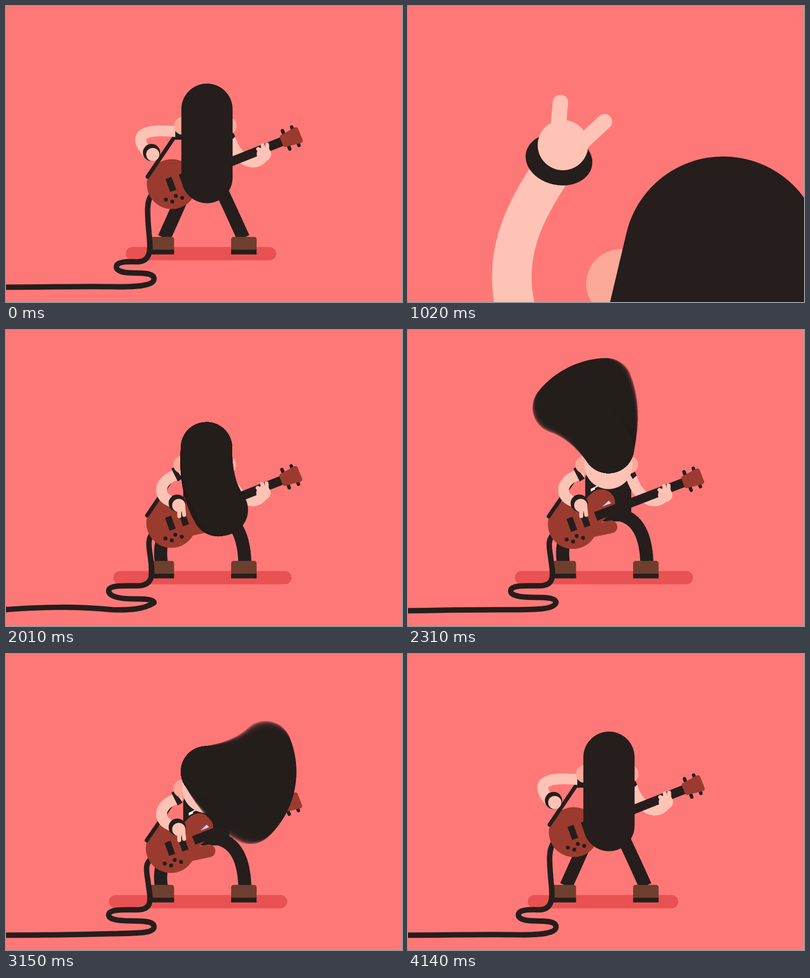
Recreate the animation shown at these times as an HTML page with a canvas. Size 800 px wide and 600 px high, loop 4560 ms.

```html
<!DOCTYPE html>
<html lang="en">
<head>
<meta charset="utf-8">
<title>Guitarist</title>
<style>
html, body { margin: 0; width: 100%; height: 100%; overflow: hidden; background: #ff7878; }
canvas { display: block; width: 100%; height: 100%; }
</style>
</head>
<body>
<canvas id="stage" width="800" height="600"></canvas>
<script>
const ctx = document.getElementById('stage').getContext('2d');
const LOOP = 4560, STEP = 30;
const CUT_IN = 690, FLASH = 1500, CUT_OUT = 1740, SPIN_END = 3640;
const PINK = '#ff7878', INK = '#251e1c', SKIN = '#ffc3b5', EAR = '#fca999', WOOD = '#9b3b2f';

const rad = d => d * Math.PI / 180;
const mix = (a, b, u) => a + (b - a) * u;
const ease = u => u * u * (3 - 2 * u);
const ramp = (t, from, to) => ease(Math.min(1, Math.max(0, (t - from) / (to - from))));

function fill(color) {
  ctx.fillStyle = color;
  ctx.fill();
}

function disc(x, y, r, color) {
  ctx.beginPath();
  ctx.arc(x, y, r, 0, 7);
  fill(color);
}

function box(x, y, w, h, r, color) {
  ctx.beginPath();
  ctx.roundRect(x, y, w, h, r);
  fill(color);
}

function poly(points, color) {
  ctx.beginPath();
  for (const p of points) ctx.lineTo(...p);
  ctx.closePath();
  fill(color);
}

function stroke(width, color, cap = 'round') {
  ctx.lineWidth = width;
  ctx.lineCap = cap;
  ctx.lineJoin = 'round';
  ctx.strokeStyle = color;
  ctx.stroke();
}

function line(x0, y0, x1, y1, width, color, cap) {
  ctx.beginPath();
  ctx.moveTo(x0, y0);
  ctx.lineTo(x1, y1);
  stroke(width, color, cap);
}

// Limb as one cubic curve
function limb([a, b, c, d], width, color, cap) {
  ctx.beginPath();
  ctx.moveTo(...a);
  ctx.bezierCurveTo(...b, ...c, ...d);
  stroke(width, color, cap);
}

// Points part way between two poses
const pose = (from, to, u) => from.map((p, i) => p.map((v, j) => mix(v, to[i][j], u)));

function placed(x, y, angle, draw) {
  ctx.save();
  ctx.translate(x, y);
  ctx.rotate(rad(angle));
  draw();
  ctx.restore();
}

// ---- hair windmill ----
// Time, root angle in degrees, speed in degrees per ms
const SPIN = [[1940, 90, 0], [2610, 915, 3.1], [3150, 2222, 1.5], [SPIN_END, 2610, 0]];
const SHUTTER = 44, COPIES = 64;

function hairAngle(t) {
  const i = SPIN.findIndex(s => t < s[0]);
  if (i <= 0) return 90;
  const [t0, a, va] = SPIN[i - 1], [t1, b, vb] = SPIN[i];
  const d = t1 - t0, u = (t - t0) / d;
  return mix(a, b, ease(u)) + d * u * (1 - u) * (va * (1 - u) - vb * u);
}

// The tip trails the root, then swings out
function hairBend(t) {
  if (t < SPIN_END) return 15 * ramp(t, CUT_OUT, 2010);
  const rest = t - SPIN_END;
  return t < 4140 ? 15 * Math.exp(-rest / 120) * Math.cos(rest / 80) : 0;
}

function lock(x, y, angle, bend, length) {
  const root = rad(angle), tip = rad(angle - bend);
  ctx.beginPath();
  ctx.moveTo(x, y);
  ctx.quadraticCurveTo(x + Math.cos(root) * length * .6, y + Math.sin(root) * length * .6,
    x + Math.cos(tip) * length, y + Math.sin(tip) * length);
  stroke(103.5, INK);
}

function hair(t, k) {
  const crouch = Math.max(0, k), bend = hairBend(t);
  const angle = t < SPIN_END ? hairAngle(t) : 90;
  const span = t < SPIN_END ? angle - hairAngle(t - SHUTTER) : 0;
  const draw = a => lock(406 - crouch, 209 + 29.5 * k, a, bend, mix(139, 130, crouch));
  if (span < .5) return draw(angle);
  ctx.globalAlpha = .45;
  for (let i = 0; i < COPIES; i++) draw(angle - span * i / (COPIES - 1));
  ctx.globalAlpha = 1;
}

// ---- wide shot ----
function cord(t, k) {
  const c = Math.max(0, k), lift = 32 * Math.min(0, k);
  const flick = ramp(t, CUT_OUT, 2000) * (1 - ramp(t, 2040, 2450));
  const left = mix(223, 207.5, c), mid = 541 + 4 * flick, right = 299;
  const side = mix(289, 287, c) + 5 * flick;
  ctx.beginPath();
  ctx.moveTo(-5, 570 - 3 * flick);
  ctx.bezierCurveTo(80, 570 - 9 * flick, 140, mix(568, 569, c) - 9 * flick, 215, mix(569, 567, c));
  ctx.bezierCurveTo(270 - 20 * flick, mix(570, 566, c) + 2 * flick, right - 20 * flick, 566, right, 553);
  ctx.bezierCurveTo(right, mid, 275, mid, 255, mid);
  ctx.bezierCurveTo(left + 14, mid, left, 537, left, 529);
  ctx.bezierCurveTo(left, 518, left + 22, 518, 262, 518.5);
  ctx.bezierCurveTo(mix(295, 302, c), 520, side + 3, 490, side, 462);
  ctx.bezierCurveTo(side - 3, mix(425, 440, c), mix(282, 279, c) + 6 * flick, mix(395, 425, c) + lift,
    296, mix(380, 412, c) + lift);
  stroke(11, INK);
}

function leg(hip, knee, foot) {
  ctx.beginPath();
  ctx.moveTo(...hip);
  ctx.quadraticCurveTo(...knee, ...foot);
  stroke(26.5, INK, 'butt');
}

function legs(k) {
  const c = Math.max(0, k), hipY = mix(375, 373, c) + 30 * Math.min(0, k);
  leg([mix(362, 372, c), hipY], [mix(341, 304, c), mix(422, 395, c)], [mix(319.5, 313.5, c), 470]);
  leg([mix(436, 417, c), hipY], [mix(458, 479, c), mix(422, 377, c)], [mix(479.5, 482.5, c), 470]);
  for (const x of [288, 454.8]) {
    box(x, 468, 51.5, 27, [5, 5, 0, 0], '#6e3f2e');
    box(x, 494, 51.5, 9.5, 0, INK);
  }
}

// Drawn around the middle of the body
function guitar() {
  disc(0, 0, 50.5, WOOD);
  line(30, -16, 57, -43, 56, WOOD);
  line(35, 14, 77, 5, 26, WOOD);
  poly([[59, -36], [72, -48], [77, -43]], '#c4d8ff');
  for (const x of [-2, 25])
    placed(x, -x / 3, -20, () => box(-6.5, -14, 13, 28, 0, INK));
  for (let i = 0; i < 4; i++) {
    const col = i % 2, row = i >> 1;
    disc(13 * col + 20 * row - 12, 31.5 + 4 * col - 7.5 * row, 4, INK);
  }
  placed(46, -16, -21.7, () => {
    line(0, 0, 193, 0, 18.5, INK, 'butt');
    for (const x of [199, 219])
      for (const side of [-1, 1]) line(x, 12 * side, x, 20 * side, 7, INK);
    poly([[194, -8], [225, -12], [225, 12], [194, 8]], WOOD);
    stroke(10, WOOD);
  });
  line(-49, -15, 7, -98, 8, INK);
  disc(186, -61, 14.5, SKIN);
  for (let i = 0; i < 3; i++)
    line(183 + 5 * i, -62, 174.5 + 9 * i, [-71, -79, -80][i], 8, SKIN);
}

function strumArm(s) {
  limb(pose([[347, 255], [290, 249], [248, 255], [288, 300]],
    [[347, 263], [305, 275], [305, 315], [345, 320]], s), 22, SKIN);
  const [[cx, cy], [hx, hy]] = pose([[294, 297], [296.5, 301]], [[347, 321], [350, 325.5]], s);
  disc(cx, cy, 17.5, INK);
  disc(hx, hy, 13.3, SKIN);
  for (const x of [1, 11]) line(hx + x * .8, hy, hx + x * s, hy + (22 - x / 4) * s, 8, SKIN);
}

function torso() {
  box(359, 262, 93, 96, 8, INK);
  limb([[453, 270], [468, 315], [505, 330], [522, 302]], 22, SKIN);
  ctx.beginPath();
  for (const p of [[383, 287], [371, 293], [378, 292], [371, 296]]) ctx.lineTo(...p);
  stroke(2.5, '#fff');
}

function headAndSleeves(s) {
  poly(pose([[342, 253], [356, 253], [356, 271], [342, 271]],
    [[335, 251], [341, 248], [358, 271], [348, 277]], s), INK);
  poly([[449, 262], [459, 256], [463, 265], [455, 272]], INK);
  for (const x of [357, 448]) disc(x, 243, 18, EAR);
  disc(406, 244, 48.5, SKIN);
}

function wide(t) {
  const intro = t < CUT_IN;
  const k = intro ? -.6 * ramp(t, 0, 540) : ramp(t, CUT_OUT, 2005) - ramp(t, SPIN_END, 4110);
  const strum = intro ? 0 : 1 - ramp(t, SPIN_END, 4080);
  const sag = ramp(t, 2010, 2250) - ramp(t, SPIN_END, 4080);
  const c = Math.max(0, k), drop = 30 * k;
  const center = 394 + 3 * c - 10 * (ramp(t, 2010, 3450) - ramp(t, SPIN_END, 4110));
  const half = mix(152, 180, c);

  box(center - half, 488.5, 2 * half, 27, 13.5, '#e85252');
  legs(k);
  cord(t, k);
  placed(-c, drop, 0, torso);
  placed(335 - c - sag, 361 + drop + 2.3 * sag, .6 * sag, guitar);
  placed(-c, drop, 0, () => {
    strumArm(strum);
    headAndSleeves(strum);
  });
  hair(t, k);
}

// ---- close-up ----
const STREAK_TIPS = [[58, 63], [302, 28], [516, 77], [690, 53], [787, 280],
  [777, 562], [649, 576], [110, 570], [79, 494], [31, 402]];

// Rays from the middle, widest towards the corners
function streaks(t) {
  const grow = 1 + (t - FLASH) / 700;
  for (const [x, y] of STREAK_TIPS) {
    const angle = Math.atan2(y - 300, x - 400);
    const reach = Math.hypot(x - 400, y - 300) * grow;
    const width = 300 * (.03 + .17 * Math.sin(2 * angle) ** 4);
    placed(400, 300, angle * 180 / Math.PI, () =>
      poly([[reach, 0], [reach + 300, -width], [reach + 300, width]], '#45c2fb'));
  }
}

function closeUp(t) {
  const flash = t >= FLASH;
  const fall = ramp(t, FLASH, CUT_OUT);
  const rise = ramp(t, CUT_IN, 1020);
  // Fist shoots up, overshoots and settles; later it drops
  const fist = flash ? mix(47, 330, fall)
    : mix(mix(300, -180, ramp(t, CUT_IN, 810)), 0, ramp(t, 810, 1020)) + 3 * ramp(t, 1020, 1110);
  const tilt = flash ? mix(18.3, 24, fall) : 13.3 * rise;
  const dip = flash ? mix(11, 60, fall) : 30 * (rise - 1);

  if (flash) box(0, 0, 800, 600, 0, '#92576a');
  limb([[218, 620 + fist * .5], [199, 530 + fist * .5], [208, 450 + fist * .6], [299, 322 + fist]],
    80, SKIN, 'butt');
  placed(-fist / 30, fist, 0, () => {
    ctx.beginPath();
    ctx.ellipse(305, 311, 68, 52, rad(12), 0, 7);
    fill(INK);
    disc(313, 282, 51, SKIN);
    line(303, 250, 308, 195.5, 31, SKIN);
    line(345, 283, 397, 234.5, 31, SKIN);
  });
  disc(430 - dip / 11, 563 + dip * .4, 70, EAR);
  placed(637 - dip * .36, 506 + dip, tilt, () => line(0, 0, 0, 600, 402, INK));
  if (flash) streaks(t);
}

const start = performance.now();

function frame() {
  const t = Math.floor((performance.now() - start) % LOOP / STEP) * STEP;
  box(0, 0, 800, 600, 0, PINK);
  if (t >= CUT_IN && t < CUT_OUT) closeUp(t);
  else wide(t);
  requestAnimationFrame(frame);
}
frame();
</script>
</body>
</html>
```
